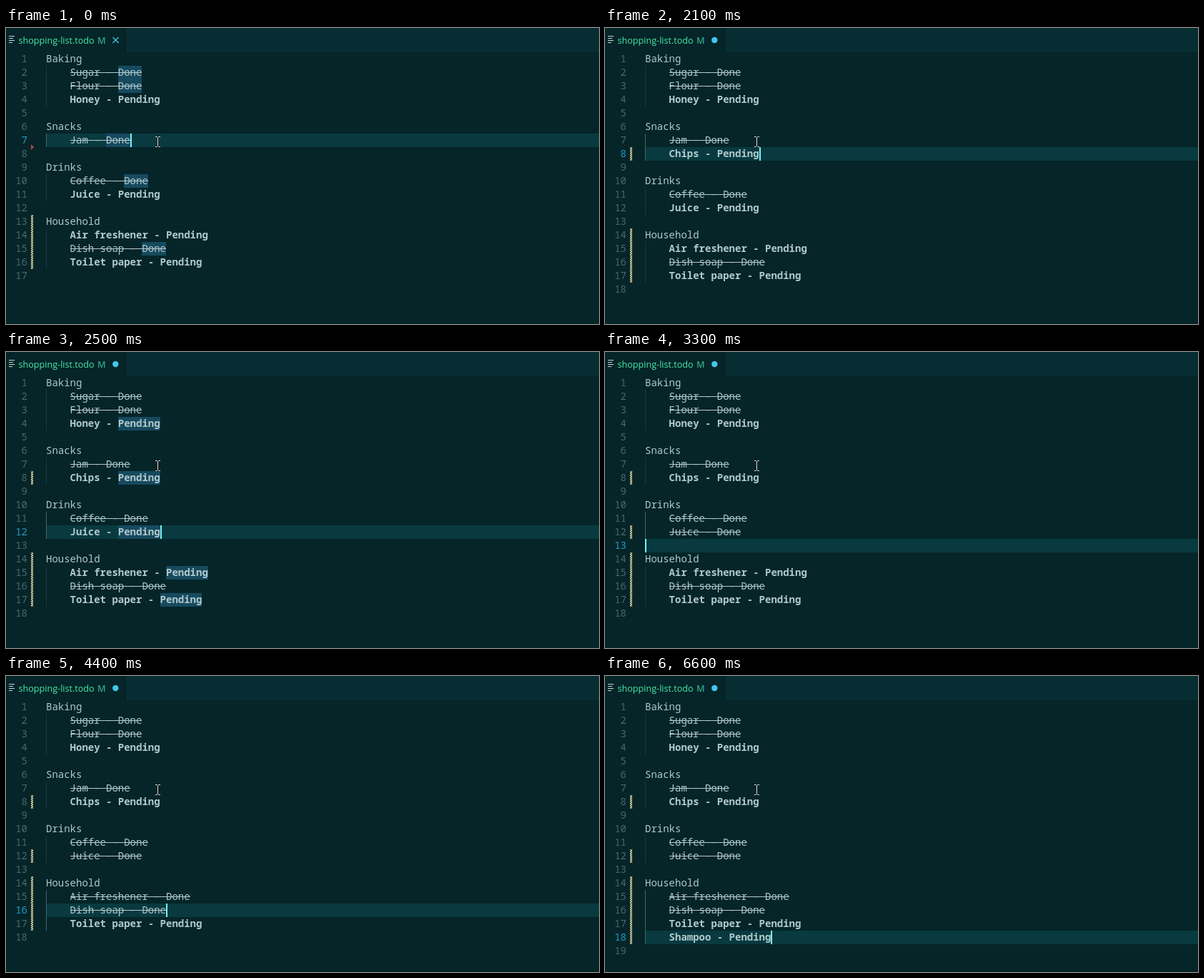
An HTML page that plays this animation: 830 by 415 pixels, repeating every 6700 ms.

```html
<!DOCTYPE html>
<html lang="en">
<head>
<meta charset="utf-8">
<title>Todo list editor</title>
<style>
  html, body { margin: 0; width: 100%; height: 100%; overflow: hidden; background: #052529; }
  #stage { position: relative; width: 830px; height: 415px; overflow: hidden;
    background: #052529; color: #b2cacd; font: 14px/19px "Noto Sans Mono", monospace; }
  #stage div, #stage svg { position: absolute; }
  .tabs { left: 168px; right: 0; top: 0; height: 34px; background: #062d32; }
  .edge { left: 167px; top: 0; width: 1px; height: 34px; background: #041e21; }
  .name { left: 17.5px; top: 8px; color: #49e9a6; white-space: pre;
    font: 12.6px/19px "Open Sans", sans-serif; }
  .flag { left: 128px; top: 8px; color: #32a680; font: 600 12.6px/19px "Open Sans", sans-serif; }
  #rows { inset: 34px 0 0; }
  .row { left: 0; width: 830px; height: 19px; }
  .current { left: 56px; right: 0; height: 19px; background: #083a40; }
  .guide { left: 56px; width: 1px; height: 19px; background: #173b40; }
  .guide.on { background: #3d686d; }
  .hit { height: 19px; background: #164a5e; }
  .num { left: 0; width: 30px; top: -1px; text-align: right; color: #47686c; }
  .num.on { color: #1f9bc6; }
  .text { left: 56px; top: -1px; white-space: pre; }
  .pending { font-weight: 700; }
  .strike { left: 89.6px; top: 9px; height: 1px; background: #b2cacd; }
  .mark { left: 35px; width: 3px; height: 19px;
    background: repeating-linear-gradient(-45deg, #d9cf9d 0 1.2px, #2b4039 1.2px 2.12px); }
  .caret { width: 2px; height: 19px; background: #7df0f5; }
  .gone { left: 35px; top: 129px; border: solid transparent; border-width: 4px 0 4px 4px;
    border-left-color: #a5502f; }
</style>
</head>
<body>
<div id="stage">
  <div class="tabs"></div>
  <div class="edge"></div>
  <svg width="168" height="34" fill="none">
    <path d="M4 12.5h8M4 15.5h6M4 18.5h8M4 21.5h5" stroke="#c4d4d5" transform="translate(0 -1)"/>
    <path id="cross" d="M149.5 13l8 8m0-8l-8 8" stroke="#40d4e7" stroke-width="1.2"/>
    <circle id="dot" cx="153.3" cy="17" r="4.2" fill="#41c7ec"/>
  </svg>
  <div class="name">shopping-list.todo</div>
  <div class="flag">M</div>
  <div id="rows"></div>
  <svg style="left:208px;top:151px" width="9" height="17" fill="none">
    <path d="M1 1.5h2.5l1 1 1-1H8M4.5 2v12M1 15.5h2.5l1-1 1 1H8" stroke="#061a1d" stroke-width="2.4"/>
    <path d="M1 1.5h2.5l1 1 1-1H8M4.5 2v12M1 15.5h2.5l1-1 1 1H8" stroke="#dfe6e6"/>
  </svg>
</div>
<script>
const LOOP = 6700, CH = 8.4, LEFT = 56, LINE = 19;
const $ = id => document.getElementById(id);

const lines = `Baking
    Sugar - Done
    Flour - Done
    Honey - Pending

Snacks
    Jam - Done

Drinks
    Coffee - Done
    Juice - Pending

Household
    Air freshener - Pending
    Dish soap - Done
    Toilet paper - Pending
`.split("\n").map((text, i) => ({ text, mark: i > 11 && i < 16 }));

let row = 6, col = 14, goal = 14;
const shots = [];

function snap(time, word = "") {
  shots.push({ time, word, row, col, lines: lines.map(l => ({ ...l })) });
}
function edit(text) {
  lines[row] = { text, mark: true };
  col = goal = text.length;
}
// Types the chunks one after another, 100 ms apart.
function type(time, chunks) {
  [...chunks].forEach((s, i) => {
    edit(lines[row].text + s);
    snap(time + i * 100);
  });
}
function down(time, word) {
  row++;
  col = Math.min(goal, lines[row].text.length);
  snap(time, word);
}
function enter(time) {
  lines.splice(++row, 0, { text: "    ", mark: false });
  col = goal = 4;
  snap(time);
}
function end(time, word) {
  col = goal = lines[row].text.length;
  snap(time, word);
}
function dropWord(time) {
  edit(lines[row].text.replace(/\w+$/, ""));
  snap(time);
}

snap(0, "Done");
enter(100);
type(200, "C");
type(400, ["h", "ip", "s", " "]);
type(900, "- ");
type(1500, "Pending");
for (const t of [2200, 2300, 2400]) down(t);
down(2500, "Pending");
dropWord(2700);
type(2900, "Done");
down(3300);
down(3400);
down(3500, "freshener");
end(3600, "Pending");
dropWord(3800);
type(4000, "Done");
down(4400);
down(4500, "Pending");
end(4600, "Pending");
enter(4700);
type(4900, "Shampoo - ".slice(0, 7));
type(5600, " - ");
type(6000, "Pending");

// First and last row of the indented block the caret belongs to.
function activeBlock({ lines, row }) {
  const inside = i => lines[i] && lines[i].text.startsWith("    ");
  let a = inside(row) ? row : inside(row + 1) ? row + 1 : row - 1;
  if (!inside(a)) return [-1, -1];
  let b = a;
  while (inside(a - 1)) a--;
  while (inside(b + 1)) b++;
  return [a, b];
}

function box(parent, cls, style = {}, text = "") {
  const el = document.createElement("div");
  el.className = cls;
  el.textContent = text;
  for (const k in style) el.style[k] = style[k] + "px";
  parent.append(el);
  return el;
}

function render(shot) {
  const root = $("rows"), [first, last] = activeBlock(shot);
  root.replaceChildren();
  shot.lines.forEach(({ text, mark }, i) => {
    const on = i === shot.row, r = box(root, "row", { top: i * LINE });
    if (on) box(r, "current");
    const at = shot.word ? text.indexOf(shot.word) : -1;
    if (at >= 0) box(r, "hit", { left: LEFT + at * CH, width: shot.word.length * CH });
    if (text.startsWith("    ")) box(r, "guide" + (i >= first && i <= last ? " on" : ""));
    box(r, on ? "num on" : "num", {}, i + 1);
    box(r, / - Pending$/.test(text) ? "text pending" : "text", {}, text);
    if (/ - Done$/.test(text)) box(r, "strike", { width: (text.length - 4) * CH });
    if (mark) box(r, "mark");
    if (on) box(r, "caret", { left: LEFT + shot.col * CH });
  });
  if (shot.time < 200) box(root, "gone");
  $("cross").style.display = shot.time ? "none" : "";
  $("dot").style.display = shot.time ? "" : "none";
}

let shown = null;
function frame() {
  const t = performance.now() % LOOP;
  const shot = shots.findLast(s => s.time <= t);
  if (shot !== shown) render(shown = shot);
  requestAnimationFrame(frame);
}
frame();
</script>
</body>
</html>
```
